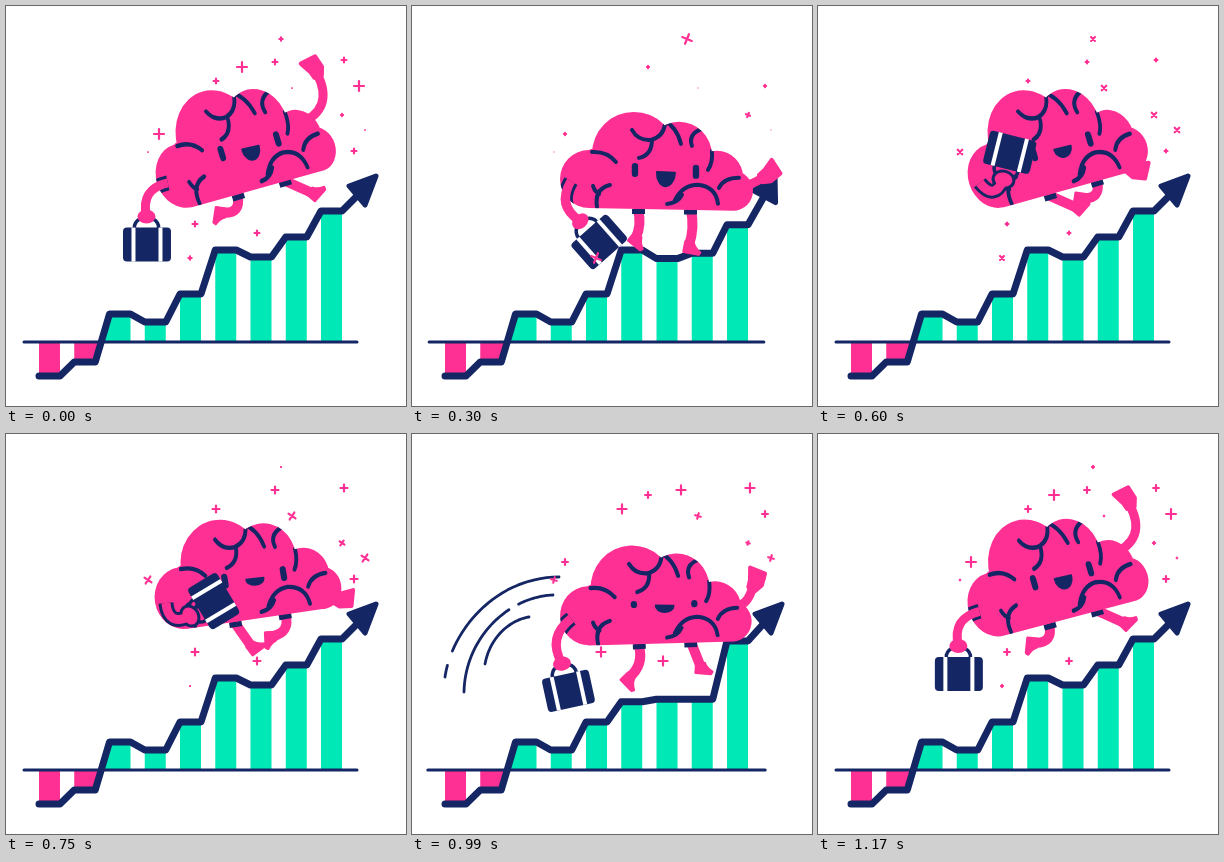
Animation of 400x400 px, one loop 1.2 s. Source, as an HTML page with a canvas:

```html
<!DOCTYPE html>
<html lang="en">
<head>
<meta charset="utf-8">
<title>Brain on the rise</title>
<style>
  html, body { margin: 0; width: 100%; height: 100%; overflow: hidden; background: #fff; }
  canvas { display: block; width: 400px; height: 400px; }
</style>
</head>
<body>
<canvas id="stage" width="400" height="400"></canvas>
<script>
const ctx = document.getElementById('stage').getContext('2d');
const PINK = '#ff3093', NAVY = '#152665', TEAL = '#00e8b5';
const LOOP = 1200, STEP = 30;

const clamp = (v, a = 0, b = 1) => Math.max(a, Math.min(b, v));
const rad = d => d * Math.PI / 180;
const wave = turns => Math.cos(2 * Math.PI * turns);

function stroke(path, color, width, cap = 'round') {
  ctx.strokeStyle = color;
  ctx.lineWidth = width;
  ctx.lineCap = cap;
  ctx.lineJoin = 'round';
  ctx.stroke(path);
}
function fill(path, color, edge = 0) {
  ctx.fillStyle = color;
  ctx.fill(path);
  if (edge) stroke(path, color, edge);
}
function place(x, y, angle, draw) {
  ctx.save();
  ctx.translate(x, y);
  ctx.rotate(rad(angle));
  draw();
  ctx.restore();
}
// A limb from a to b, bowed sideways.
function limb([ax, ay], [bx, by], bow) {
  const dx = bx - ax, dy = by - ay, k = bow / Math.hypot(dx, dy);
  return new Path2D(`M${ax},${ay}Q${(ax + bx) / 2 - dy * k},${(ay + by) / 2 + dx * k} ${bx},${by}`);
}

// Brain parts share one upright coordinate system, pinned at PIN.
const PIN = [248.5, 202.5];
const brain = new Path2D();
for (const [x, y, r] of [[176, 172, 29], [221, 147, 42], [266, 148, 33], [304, 170, 26], [320, 184, 20]]) {
  brain.moveTo(x + r, y);
  brain.arc(x, y, r, 0, 7);
}
brain.addPath(new Path2D('M176,143L221,125L266,130L300,160L322,204L174,201Z'));
const folds = new Path2D(
  'M179,145Q194,144 203,155 M180,179Q182,185 186,187 M197,178Q181,182 184,200' +
  'M219,123Q225,134 238,133Q250,130 252,118 M239,133Q239,148 226,151' +
  'M250,113Q264,120 268,137 M289,122Q275,127 279,139 M299,144Q300,156 295,163' +
  'M306,181Q311,171 326,171' +
  'M254,197Q265,196 269,188M262,193Q270,178 285,178Q303,180 305,197');
const handShape = new Path2D('M-4,2L-6,-5L-12,-16L4,-18L7,-6L4,2Z');
const footShape = new Path2D('M-4,-3L4,-3Q6,2 12,5L11,7L-4,7Z');
const arrowHead = new Path2D('M15,-16L-12,-6L4,13Z');

// All that the parts need to know about one moment.
function moment(t) {
  const turn = t / LOOP, second = t >= LOOP / 2;
  const hop = t % (LOOP / 2) / (LOOP / 2);
  const lean = .5 + .5 * wave(hop - .02);
  const lift = hop < .4 ? Math.sin(Math.PI * hop / .4) ** 2 : 0;
  return {
    t, turn, second, hop,
    press: Math.sin(Math.PI * clamp((hop - .25) / .7)) ** 2,
    swing: .5 + .5 * wave(turn),
    x: 249.5 + 3 * lean,
    y: 182.5 + (second ? 32 : 21) * (1 - lean) - 14 * lift,
    angle: -17 * lean,
    sx: 1 - .06 * lean,
    sy: 1 + .12 * lean
  };
}
function inBody(m, draw) {
  place(m.x, m.y, m.angle, () => {
    ctx.scale(m.sx, m.sy);
    ctx.translate(-PIN[0], -PIN[1]);
    draw();
  });
}
function joint(m, px, py) {
  const dx = (px - PIN[0]) * m.sx, dy = (py - PIN[1]) * m.sy;
  const c = Math.cos(rad(m.angle)), s = Math.sin(rad(m.angle));
  return [m.x + dx * c - dy * s, m.y + dx * s + dy * c];
}

// Each landing pushes the last bars down; they spring back.
const TOPS = [370, 356, 308, 316, 288, 244, 251, 231, 205];
function drawChart({ press, second }) {
  const push = second ? [25, 15, 36, 2] : [0, 2, 20, 17];
  const grow = 3 * press ** 6;
  const line = new Path2D();
  TOPS.forEach((rest, i) => {
    const top = rest + (push[i - 5] || 0) * press;
    const x = 33 + 35.25 * i, end = x + 21;
    const left = i === 2 ? 96 : x, right = i === 1 ? 95 : end;
    fill(new Path2D(`M${x},${top}H${end}L${right},336H${left}Z`), i < 2 ? PINK : TEAL);
    line.lineTo(x, top);
    line.lineTo(end, top);
  });
  line.lineTo(354, 187);
  stroke(new Path2D(`M${18 - grow},336H${351 + grow}`), NAVY, 3);
  stroke(line, NAVY, 7);
  place(355, 186, second ? 0 : -27 * press, () => fill(arrowHead, NAVY, 5));
}

// Both legs run the same cycle, half a loop apart.
function drawLeg(m, hipX, turn) {
  const hip = joint(m, hipX, 203);
  const c = wave(turn), c2 = wave(2 * turn), s = wave(turn - .25);
  const dx = 2 + 21 * c + 4 * c2;
  const dy = 23 - 2.5 * c - 8.5 * c2 + 4 * s;
  const ankle = [hip[0] + dx, hip[1] + dy];
  stroke(limb(hip, ankle, -.8 * Math.max(0, 4 - dx)), PINK, 10);
  place(...ankle, 25 - 75 * wave(turn - .03), () => fill(footShape, PINK, 3));
}

function drawWave(m) {
  const raise = m.swing ** 3;
  const wrist = [m.x + 59 + 42 * Math.sin(Math.PI * m.swing), m.y - 20 - 94 * raise];
  stroke(limb(joint(m, 310, 158), wrist, 28), PINK, 9);
  place(...wrist, 110 - 130 * Math.sqrt(raise), () => fill(handShape, PINK, 4));
}

function drawBrain(m) {
  const mouth = 9.5 + 4.5 * wave(m.turn - .2);
  const eye = 14 - 7 * clamp(1 - Math.abs(m.hop - .65) / .12);
  inBody(m, () => {
    stroke(new Path2D('M219,204.5H232M271,205H284'), NAVY, 5, 'butt');
    fill(brain, PINK);
    ctx.save();
    ctx.clip(brain);
    stroke(folds, NAVY, 4);
    ctx.restore();
    for (const [x, y] of [[222, 163], [283, 165]])
      stroke(new Path2D(`M${x},${y - eye / 2 + 3.2}V${y + eye / 2 - 3.2}`), NAVY, 6.4);
    place(253, 165.5, 3, () =>
      fill(new Path2D(`M-9,0H9A9,${mouth} 0 0 1 -9,0Z`), NAVY, 2));
  });
}

function drawCaseArm(m) {
  const up = (1 - m.swing) ** 2;
  const x = m.x - 112 + 45 * (1 - (1 - up) ** 4), y = m.y + 28 - 37 * up ** .6;
  const angle = -166 * up;
  const arm = limb(joint(m, 158, 174), [x, y], 20);
  const hand = new Path2D();
  hand.ellipse(x, y, 9, 7, rad(angle), 0, 7);
  ctx.save();
  inBody(m, () => {
    ctx.clip(brain);
    ctx.setTransform(1, 0, 0, 1, 0, 0);
    stroke(arm, NAVY, 15, 'butt');
    stroke(hand, NAVY, 6);
  });
  ctx.restore();
  stroke(arm, PINK, 9, 'butt');
  place(x, y, angle, () => {
    stroke(new Path2D('M-12,12V9Q-10,3 -5,2H5Q10,3 12,9V12'), NAVY, 3.5);
    const box = new Path2D();
    box.roundRect(-23.5, 11, 48, 34, 4);
    fill(box, NAVY);
    ctx.fillStyle = '#fff';
    ctx.fillRect(-15, 11, 4, 34);
    ctx.fillRect(12, 11, 4, 34);
  });
  fill(hand, PINK);
}

// Part of a cubic between two parameters.
function arcPart(p, from, to) {
  if (to <= from) return;
  const path = new Path2D();
  for (let i = 0; i <= 24; i++) {
    const u = from + (to - from) * i / 24, v = 1 - u;
    const w = [v * v * v, 3 * v * v * u, 3 * v * u * u, u * u * u];
    path.lineTo(w.reduce((s, k, j) => s + k * p[2 * j], 0),
                w.reduce((s, k, j) => s + k * p[2 * j + 1], 0));
  }
  stroke(path, NAVY, 2.8);
}
const arcs = [ // curve, gap, start, end
  [[33, 243, 40, 195, 85, 143, 147, 143], .08, .18, 780, 960],
  [[52, 258, 53, 205, 95, 163, 141, 161], .66, .74, 835, 980],
  [[73, 230, 78, 203, 98, 186, 117, 183], 1, 1, 890, 990]];
function drawSwoosh({ t }) {
  if (t < 810 || t > 1080) return;
  const tail = clamp((t - 990) / 110);
  const drop = clamp((990 - t) / 120, 0, 1.5);
  place(-2 * drop, -14 * drop, 0, () => {
    for (const [p, gapA, gapB, start, end] of arcs) {
      const head = clamp((t - start) / (end - start));
      arcPart(p, tail, Math.min(head, gapA));
      arcPart(p, Math.max(tail, gapB), head);
    }
  });
}

const sparkles = [ // each group pulses around its own peak
  { peak: .28, mean: 3, pulse: 3, spin: 45, at: [[275, 33], [184, 252]] },
  { peak: 0, mean: 2, pulse: 3.8, spin: 0, at: [[236, 61], [353, 80], [153, 128]] },
  { peak: .78, mean: 2.75, pulse: 2.75, spin: 0,
    at: [[269, 56], [338, 54], [210, 75], [348, 145], [189, 218], [251, 227]] },
  { peak: .65, mean: 2.6, pulse: 2.4, spin: 45, at: [[286, 82], [359, 124], [142, 146]] },
  { peak: .5, mean: 3, pulse: 1, spin: 45, at: [[336, 109]] }];
function drawSparkles({ turn }) {
  for (const { peak, mean, pulse, spin, at } of sparkles) {
    const r = mean + pulse * wave(turn - peak);
    if (r < .4) continue;
    const arm = Math.max(.1, r - .8);
    const plus = new Path2D(`M${-arm},0H${arm}M0,${-arm}V${arm}`);
    for (const [x, y] of at)
      place(x, y, spin * (1 - Math.abs(2 * turn - 1)), () => stroke(plus, PINK, clamp(r, 1, 2.2)));
  }
}

function frame(now) {
  const m = moment(Math.floor(now % LOOP / STEP) * STEP);
  ctx.fillStyle = '#fff';
  ctx.fillRect(0, 0, 400, 400);
  drawChart(m);
  drawSwoosh(m);
  drawWave(m);
  drawLeg(m, 278, m.turn);
  drawLeg(m, 225, m.turn + .5);
  drawBrain(m);
  drawCaseArm(m);
  drawSparkles(m);
}

const began = performance.now();
function tick() {
  frame(performance.now() - began);
  requestAnimationFrame(tick);
}
tick();
</script>
</body>
</html>
```
